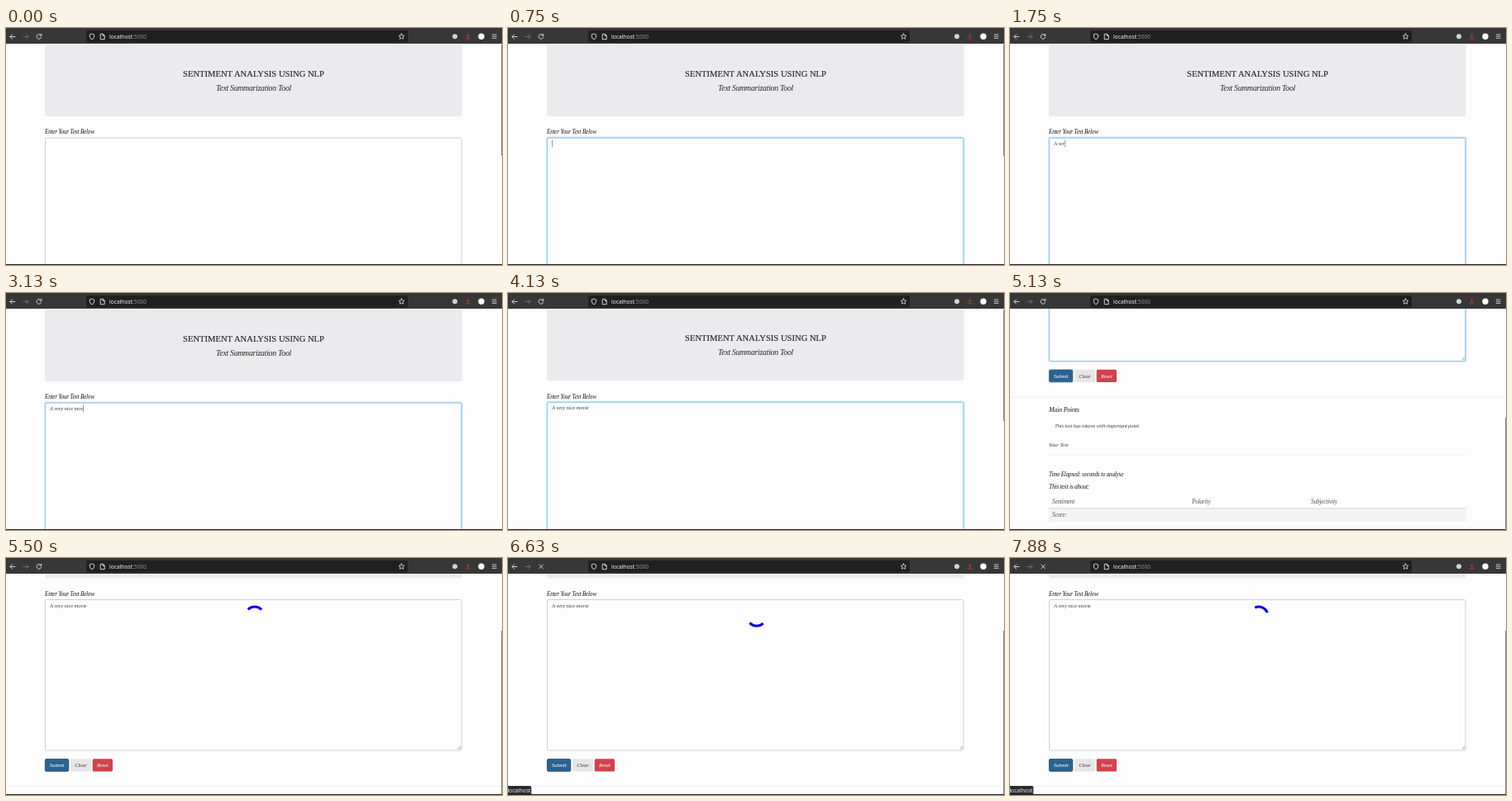
An HTML page for the animation above (8 s loop, 600 px wide and 287 px high).

```html
<!DOCTYPE html>
<html lang="en">
<head>
<meta charset="utf-8">
<title>Sentiment analysis</title>
<style>
  html, body { margin: 0; width: 100%; height: 100%; overflow: hidden; background: #fefdfd; }
  svg { display: block; width: 100%; height: 100%; }
  #page text { font: italic 7.2px "Liberation Serif", serif; letter-spacing: -.03em; fill: #444; white-space: pre; }
  #page .title { font: 10.6px "Liberation Serif", serif; letter-spacing: 0; fill: #222; stroke: #222; stroke-width: .12px; }
  #page .sub { font-size: 9.85px; fill: #2a2a2a; }
  #page .strong { fill: #1c1c1c; }
  #page .small { font-size: 6.75px; }
  #page .head { font-size: 7.4px; fill: #555; }
  #page .btn { font-size: 6.8px; text-anchor: middle; }
  .ui { font: 6.65px "Noto Sans", "Open Sans", sans-serif; fill: #f2f2f2; }
  .icon { fill: none; stroke: #e4e4e4; stroke-width: .9; stroke-linecap: round; stroke-linejoin: round; }
</style>
</head>
<body>
<svg viewBox="0 0 600 287" preserveAspectRatio="none">
  <rect width="600" height="287" fill="#fefdfd"/>
  <g id="page">
    <rect x="47" y="20" width="504.5" height="87" rx="2.5" fill="#ebeaec"/>
    <text class="title" x="299.5" y="59" text-anchor="middle">SENTIMENT ANALYSIS USING NLP</text>
    <text class="sub" x="299.5" y="76" text-anchor="middle">Text Summarization Tool</text>
    <text class="strong" x="47" y="128.3">Enter Your Text Below</text>

    <rect id="glow" x="47.5" y="133" width="503.5" height="182.5" rx="2" fill="none" stroke="#a9def7" stroke-width="3"/>
    <rect x="47.5" y="133" width="503.5" height="182.5" rx="1.5" fill="#fefdfd" stroke="#cbcbc9" stroke-width=".9"/>
    <rect id="ring" x="47.5" y="133" width="503.5" height="182.5" rx="1.5" fill="none" stroke="#86cdf2" stroke-width="1"/>
    <path d="M546.5 314l3.5-3.5M548.5 314l1.5-1.5" stroke="#777" stroke-width=".7"/>
    <text id="typed" class="small" x="53" y="142.2"></text>
    <rect id="caret" y="135.5" width=".6" height="9" fill="#555"/>

    <rect id="submit" x="47.4" y="326" width="28.4" height="14.8" rx="1.5" stroke-width=".8"/>
    <rect x="78" y="325.7" width="25" height="15.3" rx="1.5" fill="#e6e6e8"/>
    <rect x="104.7" y="325.7" width="24.3" height="15.3" rx="1.5" fill="#d0434d"/>
    <text class="btn" x="61.6" y="335.6" style="fill:#fff">Submit</text>
    <text class="btn" x="90.5" y="335.6">Clear</text>
    <text class="btn" x="116.8" y="335.6" style="fill:#fff">Reset</text>
    <rect y="358.6" width="600" height=".9" fill="#efedee"/>

    <g id="results">
      <text class="strong" x="47" y="376.5" style="font-size:8px">Main Points</text>
      <text class="small" x="54" y="396">This text has tokens with important point</text>
      <text class="small" x="47" y="418.5">Your Text</text>
      <rect x="47" y="429.5" width="504.5" height=".8" fill="#f1efef"/>
      <text class="strong" x="47" y="455">Time Elapsed: seconds to analyse</text>
      <text class="strong" x="47" y="469.7" style="font-size:7.4px">This text is about:</text>
      <rect x="47" y="494" width="504.5" height="16" fill="#f5f4f4"/>
      <rect x="47" y="493.4" width="504.5" height="1" fill="#d6d5d5"/>
      <text class="head" x="51" y="487.5">Sentiment</text>
      <text class="head" x="220" y="487.5">Polarity</text>
      <text class="head" x="364" y="487.5">Subjectivity</text>
      <text class="head" x="51" y="504.3">Score:</text>
    </g>
  </g>

  <path id="spinner" d="M-8.2 -8.2A11.6 11.6 0 0 1 8.2 -8.2" fill="none" stroke="#0808e0" stroke-width="3"/>
  <rect id="thumb" x="599" width="1" fill="#8a8a8a"/>
  <rect y="286" width="600" height="1" fill="#1f1f1f"/>
  <g id="status">
    <path d="M0 276h26.5q1.8 0 1.8 1.8V286.5H0z" fill="#2a2a2c"/>
    <text class="ui" x="-.6" y="283.7">localhost</text>
  </g>

  <rect width="600" height="19" fill="#373737"/>
  <rect x="97" y="3" width="389" height="14.6" rx="2" fill="#202020"/>
  <g class="icon">
    <path d="M11 10.5H5M7.6 7.8L4.9 10.5l2.7 2.7"/>
    <path d="M21 10.5h6M24.4 7.8l2.7 2.7-2.7 2.7" stroke="#777"/>
    <path id="reload" d="M42.4 8.7A2.9 2.9 0 1 0 42.8 11.2M42.9 7.2V9.2H40.9"/>
    <path id="stop" d="M37.8 8.2l4.6 4.6M42.4 8.2l-4.6 4.6"/>
    <path d="M104 7.2l2.7 1v2q0 2.4-2.7 3.7q-2.7-1.3-2.7-3.7v-2z"/>
    <path d="M114.6 7.3h2.8l1.8 1.8v4.6h-4.6zM117.2 7.4v2h2"/>
    <path d="M478.5 6.8l1 2.2 2.4.3-1.8 1.6.5 2.4-2.1-1.2-2.1 1.2.5-2.4-1.8-1.6 2.4-.3z" stroke-width=".8"/>
    <path d="M588.3 8h4.8M588.3 10.2h4.8M588.3 12.4h4.8" stroke-width=".8"/>
    <path d="M558.7 6.8v4M557 9.2l1.7 1.7 1.7-1.7M555.9 12.9h5.6" stroke="#c73b36"/>
  </g>
  <circle cx="543" cy="10.2" r="3" fill="#d4d4d4"/>
  <circle cx="575" cy="10.2" r="3.7" fill="#fff"/>
  <text class="ui" x="125" y="12.8">localhost<tspan fill="#8f8f8f">:5000</tspan></text>
</svg>
<script>
const LOOP = 8000;
const FULL = "A very nice movie";
// moment at which each character is typed
const KEYS = [1000, 1250, 1500, 1630, 1750, 2250, 2380, 2380, 2500, 2630, 2750, 2750, 2880, 2880, 3130, 3250, 3380];
const SENT = 5380, LOADING = 5750, TURN = 2250;

const $ = id => document.getElementById(id);
const set = (id, attrs) => {
  for (const k in attrs) $(id).setAttribute(k, attrs[k]);
};
const show = (id, on) => set(id, { visibility: on ? "visible" : "hidden" });
const clamp = v => Math.max(0, Math.min(1, v));

function scrollAt(t) {
  if (t < 4130) return 0;
  if (t < 4250) return .7;
  return t < SENT ? 233 : 82.5;
}

function thumbAt(t) {
  const fade = t < 3880 ? 1 - clamp((t - 1250) / 500) : 1;
  if (t >= SENT) return { y: 88, height: 198, opacity: fade };
  return { y: 20 + scrollAt(t) / 233 * 131, height: 134.5, opacity: fade };
}

function draw(t) {
  const sent = t >= SENT;
  set("page", { transform: `translate(0 ${-scrollAt(t)})` });
  set("thumb", thumbAt(t));

  const focus = sent || t < 250 ? 0 : clamp((t - 250) / 250 * .65 + .35);
  set("ring", { opacity: focus });
  set("glow", { opacity: focus * .5 });

  const text = FULL.slice(0, KEYS.filter(k => k <= t).length);
  if ($("typed").textContent !== text) $("typed").textContent = text;
  set("caret", { x: 53 + (text ? $("typed").getComputedTextLength() : 0) + .2 });
  show("caret", t >= 500 && t < 3880);

  const hover = t >= 5000;
  set("submit", {
    fill: hover ? "#2b6290" : "#3579b5",
    stroke: sent ? "#1d4568" : hover ? "#255680" : "#3172aa"
  });

  show("results", !sent);
  show("spinner", sent);
  const angle = 1 + (t - 5500) / TURN * 360;
  set("spinner", { transform: `translate(300.8 70.7) rotate(${angle})` });

  const loading = t >= LOADING;
  show("status", loading);
  show("stop", loading);
  show("reload", !loading);
}

let start;
function tick(now) {
  start ??= now;
  draw((now - start) % LOOP);
  requestAnimationFrame(tick);
}
draw(0);
requestAnimationFrame(tick);
</script>
</body>
</html>
```
